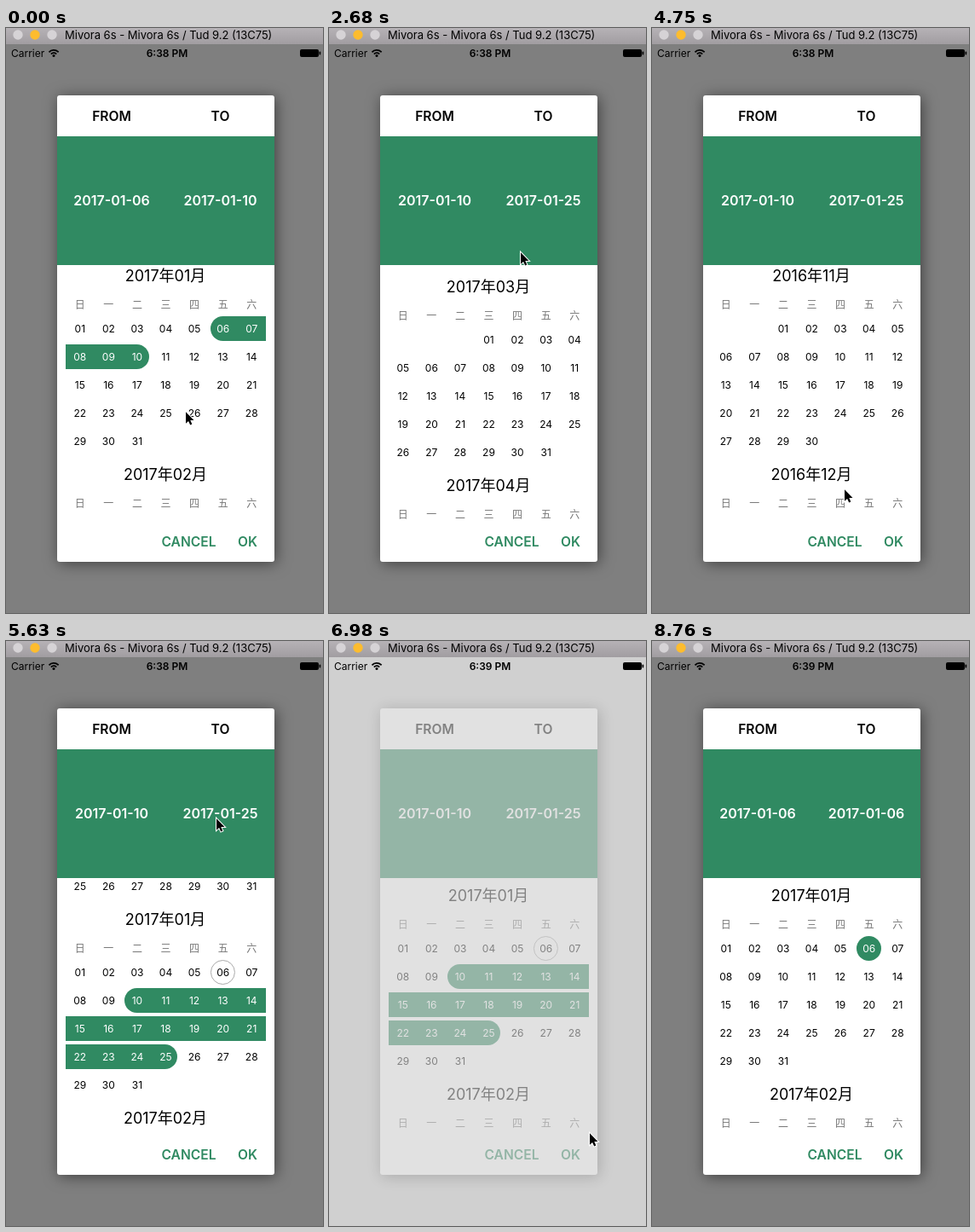
Animation, 372 px wide and 686 px high, one loop 9.16 s. Source, as an HTML page with a canvas:

```html
<!DOCTYPE html>
<html>
<head>
<meta charset="utf-8">
<title>Date range picker</title>
<style>
html, body { margin: 0; width: 372px; height: 686px; overflow: hidden; background: #fff; }
canvas { display: block; }
</style>
</head>
<body>
<canvas id="stage" width="372" height="686"></canvas>
<script>
const W = 372, H = 686, LOOP = 9160, TICK = 148.47, TICKS = 60;
const GREEN = '#308a62', COL = 33.57, LEFT = 70, ROW = 33;
const FONT = 'Inter, "Noto Sans CJK SC", "Noto Sans CJK JP", "Noto Sans CJK", sans-serif';
const screen = document.getElementById('stage').getContext('2d');
const layer = document.createElement('canvas');
layer.width = W;
layer.height = H;
const card = layer.getContext('2d');

// Times are in ticks
const clamp = p => Math.max(0, Math.min(1, p));
const progress = (k, from, to) => clamp((k - from) / (to - from));
const fling = (k, from, to) => 1 - (1 - progress(k, from, to)) ** 2.5;

const TWO_MONTHS = 466;
const scrollAt = k => 8 + (TWO_MONTHS - 8) * fling(k, 13, 19)
  + TWO_MONTHS * (fling(k, 33.85, 40) - fling(k, 21, 26) - fling(k, 28, 33));

const fadeAt = k => Math.max(1 - progress(k, 44.8, 48.3), progress(k, 52.8, 56.4));

// Each move: start, end, target x, target y
const moves = [
  [0, 2, 178, 450], [6, 10, 150, 384], [12, 14, 222, 520], [14, 18, 224, 262],
  [21, 24, 210, 440], [24, 26, 210, 279], [28, 32, 225, 540], [34, 38, 246, 207],
  [38, 43, 285, 592], [44, 47, 305, 576], [47, 51, 319, 493], [53, 59, 348, 700]
];
function pointerAt(k) {
  return moves.reduce(([x, y], [from, to, tx, ty]) => {
    const p = progress(k, from, to);
    return [x + (tx - x) * p, y + (ty - y) * p];
  }, [210, 449]);
}

function rangeAt(k) {
  if (k < 6) return [6, 10];
  if (k < 12) return [25, 25];
  return k < 50 ? [10, 25] : [6, 6];
}

// y is the middle of the capitals
function text(c, s, x, y, size, { weight = 400, color = '#000', align = 'center' } = {}) {
  c.font = `${weight} ${size}px ${FONT}`;
  c.fillStyle = color;
  c.textAlign = align;
  c.fillText(s, x, Math.round(y + size * .364));
}

function box(c, x, y, w, h, r, color) {
  c.fillStyle = color;
  c.beginPath();
  c.roundRect(x, y, w, h, r);
  c.fill();
}

function disc(c, x, y, r, color) {
  c.fillStyle = color;
  c.beginPath();
  c.arc(x, y, r, 0, Math.PI * 2);
  c.fill();
}

const pad = n => String(n).padStart(2, '0');
const colX = i => LEFT + COL * (i + .5);

function monthInfo(m) {
  const first = new Date(2017, m, 1), start = first.getDay();
  const days = new Date(2017, m + 1, 0).getDate();
  const rows = Math.ceil((start + days) / 7);
  return {
    start, days, height: 68 + ROW * rows,
    title: `${first.getFullYear()}年${pad(first.getMonth() + 1)}月`
  };
}

function drawDay(d, col, y, inJanuary, [from, to]) {
  const x = colX(col), picked = inJanuary && d >= from && d <= to;
  if (picked) {
    const l = Math.floor(d === from ? x - 14.5 : LEFT + COL * col);
    const r = Math.floor(d === to ? x + 14.5 : LEFT + COL * (col + 1) + .1);
    const a = d === from ? 14.5 : 0, b = d === to ? 14.5 : 0;
    box(card, l, y - 15, r - l, 29, [a, b, b, a], GREEN);
  } else if (inJanuary && d === 6) {
    card.strokeStyle = '#aaa';
    card.lineWidth = 1;
    card.beginPath();
    card.arc(x - .2, y - .5, 14, 0, Math.PI * 2);
    card.stroke();
  }
  text(card, pad(d), x, y, 12, { color: picked ? '#fff' : '#000' });
}

function drawMonth(m, info, y, range) {
  text(card, info.title, 187, y, 18);
  [...'日一二三四五六'].forEach((s, i) => text(card, s, colX(i), y + 34.3, 12, { color: '#777' }));
  for (let d = 1; d <= info.days; d++) {
    const cell = info.start + d - 1;
    drawDay(d, cell % 7, y + 63 + ROW * Math.floor(cell / 7), m === 0, range);
  }
}

function drawCard(scroll, range) {
  card.clearRect(0, 0, W, H);
  card.save();
  card.shadowColor = 'rgba(0,0,0,.5)';
  card.shadowBlur = 17;
  card.shadowOffsetX = card.shadowOffsetY = 2;
  box(card, 60, 79, 255, 547, 3, '#fff');
  card.restore();

  card.fillStyle = GREEN;
  card.fillRect(60, 127, 255, 151);
  ['FROM', 'TO'].forEach((label, i) => {
    const x = 124 + 127.5 * i;
    text(card, label, x, 103, 15.6, { weight: 600 });
    text(card, '2017-01-' + pad(range[i]), x, 202.5, 16, { weight: 600, color: '#fff' });
  });

  card.save();
  card.beginPath();
  card.rect(60, 278, 255, 300);
  card.clip();
  let y = 298 - scroll - TWO_MONTHS;
  for (let m = -2; m < 5; m++) {
    const info = monthInfo(m);
    drawMonth(m, info, y, range);
    y += info.height;
  }
  card.restore();

  text(card, 'CANCEL', 214.5, 602, 15.6, { weight: 600, color: GREEN });
  text(card, 'OK', 283.5, 602, 15.6, { weight: 600, color: GREEN });
}

function drawTitleBar(c) {
  const g = c.createLinearGradient(0, 0, 0, 19);
  g.addColorStop(0, '#b6b2b6');
  g.addColorStop(1, '#a19da1');
  c.fillStyle = g;
  c.fillRect(0, 0, W, 19);
  ['#d6d3d6', '#fdbc2e', '#d6d3d6'].forEach((color, i) => disc(c, 14 + 20 * i, 8, 5.7, color));
  text(c, 'Mivora 6s - Mivora 6s / Tud 9.2 (13C75)', 69, 8.3, 13, { align: 'left' });
}

function drawStatusBar(c, clock) {
  text(c, 'Carrier', 6, 29.5, 12, { align: 'left' });
  text(c, clock, 189, 29.5, 12, { weight: 600 });

  c.strokeStyle = '#000';
  c.lineWidth = 1.8;
  [4.3, 7.6].forEach(r => {
    c.beginPath();
    c.arc(56, 33.5, r, -Math.PI * .76, -Math.PI * .24);
    c.stroke();
  });
  disc(c, 56, 32.5, 1.5, '#000');

  box(c, 345, 25, 22, 9, 2, '#000');
  box(c, 367.6, 27.5, 1.6, 4, .8, '#000');
}

function drawPointer(c, x, y) {
  const shape = new Path2D('M0 0V13.5L3.1 10.7L5.2 15.3L7.3 14.4L5.3 9.9H9.5Z');
  c.save();
  c.translate(x + 1, y + 1.2);
  c.lineWidth = 2;
  c.strokeStyle = '#fff';
  c.stroke(shape);
  c.fillStyle = '#000';
  c.fill(shape);
  c.restore();
}

function draw(k) {
  const c = screen, fade = fadeAt(k);
  c.fillStyle = '#fff';
  c.fillRect(0, 0, W, H);
  c.fillStyle = `rgba(0,0,0,${fade * .5})`;
  c.fillRect(0, 19, W, H);
  drawTitleBar(c);
  drawStatusBar(c, k < 41 ? '6:38 PM' : '6:39 PM');
  if (fade > 0) {
    drawCard(Math.round(scrollAt(k)), rangeAt(k));
    c.globalAlpha = fade;
    c.drawImage(layer, 0, 0);
    c.globalAlpha = 1;
  }
  drawPointer(c, ...pointerAt(k));
}

// The picture advances at a coarse, fixed tick
const began = performance.now();
function frame() {
  const t = (performance.now() - began) % LOOP;
  draw(Math.min(TICKS - 1, Math.floor((t + 13) / TICK)));
  requestAnimationFrame(frame);
}
frame();
</script>
</body>
</html>
```
